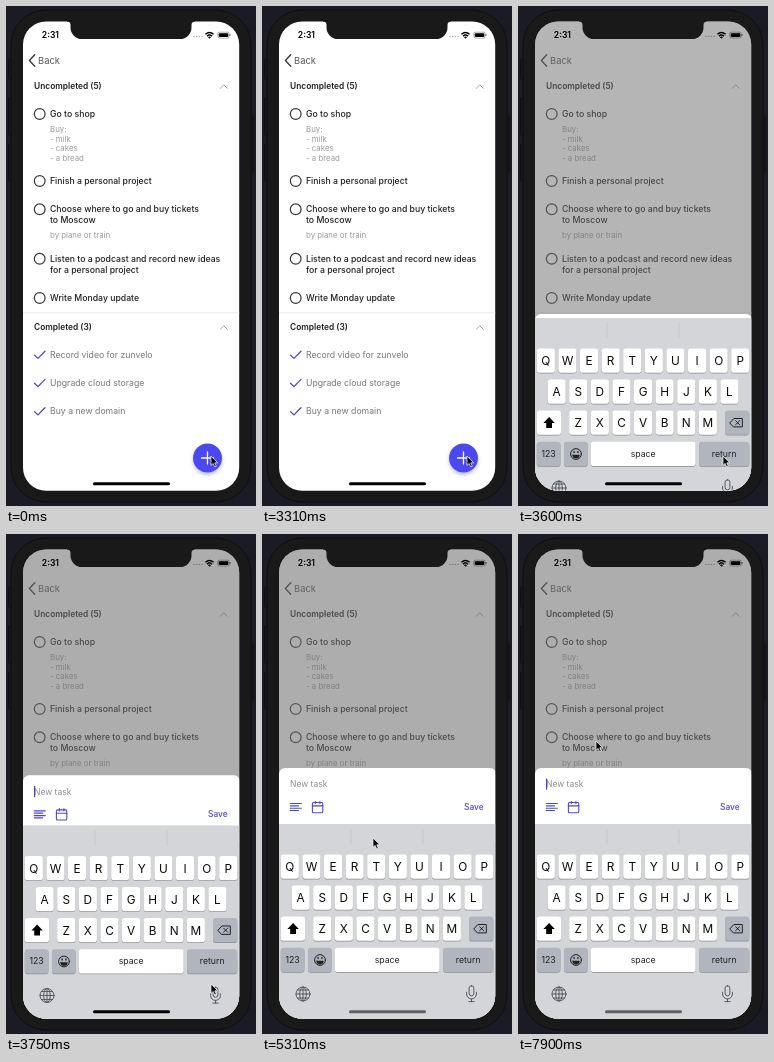
Write an HTML page that moves like this. It is 250x500 px and loops after 7.99 s.

```html
<!DOCTYPE html>
<html lang="en">
<head>
<meta charset="utf-8">
<title>New task sheet</title>
<style>
  html, body { margin: 0; width: 100%; height: 100%; overflow: hidden; background: #1a1b24; }
  svg { display: block; width: 100vw; height: 100vh; }
  text { font-family: Inter, "Open Sans", sans-serif; font-size: 8.7px; fill: #202024; white-space: pre; }
  .head { font-weight: 600; font-size: 8.4px; }
  .task { font-weight: 500; }
  .note { font-size: 7.85px; fill: #9a9a9e; }
  .done { fill: #77777b; }
  .mid { text-anchor: middle; }
  .line { fill: none; stroke-linecap: round; stroke-linejoin: round; }
  .accent { stroke: #4b45d6; }
  .letter { font-size: 11.8px; fill: #0a0a0a; }
</style>
</head>
<body>
<svg viewBox="0 0 250 500" xmlns="http://www.w3.org/2000/svg">
  <defs>
    <clipPath id="screen"><rect x="17" y="15.5" width="216.2" height="469.3" rx="23"/></clipPath>
    <filter id="soft" x="-50%" y="-50%" width="200%" height="200%"><feGaussianBlur stdDeviation="2.2"/></filter>
  </defs>

  <rect width="250" height="500" fill="#1a1b24"/>
  <g fill="#18181b" stroke="#0b0b0e" stroke-width=".7">
    <rect x="2.5" y="54" width="5" height="19" rx="1"/>
    <rect x="2.5" y="92" width="5" height="37" rx="1"/>
    <rect x="2.5" y="138" width="5" height="37" rx="1"/>
    <rect x="242" y="110" width="5" height="56" rx="1"/>
  </g>
  <rect x="5" y="4" width="240" height="492" rx="35" fill="#191919" stroke="#0e0e10"/>

  <g clip-path="url(#screen)">
    <rect x="17" y="15" width="217" height="470" fill="#fff"/>
    <g id="list">
      <path class="line" d="M28.7 48.7L23.4 54.5L28.7 60.3" stroke="#3c3c40" stroke-width="1.4"/>
      <text x="32" y="57.6" style="font-size:9.4px;fill:#56565a">Back</text>
      <path d="M17 306.8H234" stroke="#ececee"/>
    </g>
    <g id="fab">
      <circle cx="201.5" cy="454.5" r="14" fill="#4a48e8" opacity=".4" filter="url(#soft)"/>
      <circle cx="201.5" cy="452" r="14.5" fill="#4a48ee"/>
      <path class="line" d="M195.5 452H207.5M201.5 446V458" stroke="#fff" stroke-width="1.3"/>
    </g>
    <rect id="dim" x="17" y="15" width="217" height="470" fill="#6d6d6d" opacity="0"/>

    <g id="sheet">
      <rect x="17" y="234" width="217" height="270" rx="6" fill="#fff"/>
      <text x="28" y="253.4" style="font-size:8.5px;fill:#8d8d92">New task</text>
      <rect id="caret" x="28" y="244.3" width="1.2" height="11.5" rx=".5" fill="#4b45d6"/>
      <path class="line accent" d="M28.3 269.5H39.3M28.3 271.8H36.6M28.3 274.2H39.3M28.3 276.5H36.6" stroke-width="1.15"/>
      <g class="line accent" stroke-width="1.1">
        <rect x="50.4" y="268.5" width="10.4" height="10.2" rx="1.3"/>
        <path d="M50.4 271.9H60.8M53.3 267.3V269.5M57.9 267.3V269.5"/>
      </g>
      <text x="202" y="275.9" class="task" style="font-size:8.4px;fill:#4b45d6">Save</text>
    </g>

    <g id="keyboard">
      <rect x="17" y="290" width="217" height="200" fill="#d3d5d9"/>
      <path d="M89 295V310M161 295V310" stroke="#c2c4c9" stroke-width=".8"/>
      <g id="keys"></g>
      <path d="M31.1 389L36.8 395H34V400H28.2V395H25.4Z" fill="#000"/>
      <g class="line" stroke="#222" stroke-width="1">
        <path d="M212 394.7L215.8 390.5H224.3V398.9H215.8ZM217.6 392.7L221.6 396.7M221.6 392.7L217.6 396.7"/>
        <circle cx="58" cy="426" r="5.4"/>
        <path d="M54.6 427H61.4A3.4 3.2 0 0 1 54.6 427Z" fill="#222" stroke-width=".5"/>
        <path d="M56.1 423.4V424.5M59.9 423.4V424.5" stroke-width="1.3"/>
      </g>
      <g class="line" stroke="#4d5259" stroke-width=".9">
        <circle cx="41" cy="460" r="7"/>
        <ellipse cx="41" cy="460" rx="3.3" ry="7"/>
        <path d="M41 453V467M34 460H48M35.5 456H46.5M35.5 464H46.5"/>
        <rect x="207.1" y="451.8" width="4.8" height="10" rx="2.4"/>
        <path d="M204.6 458.3V460A4.9 4.9 0 0 0 214.4 460V458.3M209.5 465V467.6M206.8 467.6H212.2"/>
      </g>
    </g>

    <rect id="home" x="87" y="476.2" width="77" height="3" rx="1.5"/>

    <text x="35.8" y="32.2" class="head" style="font-size:8.6px;fill:#000">2:31</text>
    <g opacity=".3">
      <circle cx="188" cy="30.5" r=".8"/><circle cx="190.7" cy="30.5" r=".8"/>
      <circle cx="193.4" cy="30.5" r=".8"/><circle cx="196.1" cy="30.5" r=".8"/>
    </g>
    <g fill="none" stroke="#000" stroke-width="1.4">
      <path d="M199.4 28.2Q203.5 24.6 207.6 28.2M201 30.1Q203.5 27.9 206 30.1"/>
    </g>
    <path d="M202 31.2Q203.5 30 205 31.2L203.5 32.8Z"/>
    <rect x="211.7" y="26.2" width="11.6" height="5.8" rx="1.7" fill="none" stroke="#000" stroke-opacity=".5" stroke-width=".6"/>
    <rect x="212.7" y="27.2" width="9.6" height="3.8" rx=".9"/>
    <path d="M224 28.1V30.1" stroke="#000" stroke-opacity=".5"/>
  </g>

  <path d="M61 14.5H189V15.5Q185.5 15.5 185.5 19V21.5A11.5 11.5 0 0 1 174 33H76A11.5 11.5 0 0 1 64.5 21.5V19Q64.5 15.5 61 15.5Z" fill="#191919"/>
  <path id="cursor" d="M0 0V9.4L2.2 7.4L3.7 10.9L5.3 10.2L3.8 6.8H6.8Z" fill="#000" stroke="#fff" stroke-width=".7"/>
</svg>

<script>
const LOOP = 7990, STEP = 50;
const OPEN = 3500, SETTLED = 4900;
const $ = id => document.getElementById(id);

function add(parent, tag, attrs, content = '') {
  const node = document.createElementNS('http://www.w3.org/2000/svg', tag);
  for (const name in attrs) node.setAttribute(name, attrs[name]);
  node.textContent = content;
  parent.append(node);
}

// List content: class, vertical centre, text
const rows = [
  ['head', 80.3, 'Uncompleted (5)'],
  ['task', 108, 'Go to shop'],
  ['note', 123, 'Buy:'], ['note', 132.6, '- milk'], ['note', 142.2, '- cakes'], ['note', 151.8, '- a bread'],
  ['task', 175, 'Finish a personal project'],
  ['task', 203.3, 'Choose where to go and buy tickets'], ['task more', 214.3, 'to Moscow'],
  ['note', 229.2, 'by plane or train'],
  ['task', 252.8, 'Listen to a podcast and record new ideas'], ['task more', 263.8, 'for a personal project'],
  ['task', 292, 'Write Monday update'],
  ['head', 321.3, 'Completed (3)'],
  ['done', 348.8, 'Record video for zunvelo'],
  ['done', 377, 'Upgrade cloud storage'],
  ['done', 405.3, 'Buy a new domain']
];
const list = $('list');
for (const [kind, y, label] of rows) {
  add(list, 'text', { class: kind, x: kind === 'head' ? 28 : 44, y: y + 3.1 }, label);
  if (kind === 'task')
    add(list, 'circle', { cx: 33.7, cy: y, r: 5.4, fill: 'none', stroke: '#37373b', 'stroke-width': 1.2 });
  if (kind === 'done')
    add(list, 'path', { class: 'line accent', d: `M28.5 ${y + .3}L32 ${y + 3.6}L39 ${y - 3.6}`, 'stroke-width': 1.3 });
  if (kind === 'head')
    add(list, 'path', { class: 'line', d: `M214.3 ${y + 2}L217.8 ${y - 1.5}L221.3 ${y + 2}`, stroke: '#a5a5aa' });
}

// Keyboard
const PITCH = 21.6, KEY_W = 18.1, KEY_H = 24.2;
function key(x, y, w, fill, label = '', kind = '') {
  const box = { x, width: w, height: KEY_H, rx: 2.8 };
  add($('keys'), 'rect', { ...box, y: y + .8, fill: '#8b8e94' });
  add($('keys'), 'rect', { ...box, y, fill });
  add($('keys'), 'text', { class: 'mid ' + kind, x: x + w / 2, y: y + (kind ? 16.5 : 15.2) }, label);
}
const GREY = '#b0b5be', WHITE = '#fff';
['QWERTYUIOP', 'ASDFGHJKL', 'ZXCVBNM'].forEach((letters, row) => {
  const left = 18.8 + PITCH * [0, .5, 1.5][row];
  [...letters].forEach((c, i) => key(left + i * PITCH, 320.6 + row * 31, KEY_W, WHITE, c, 'letter'));
});
key(18.8, 382.6, KEY_W + 6.1, WHITE);
key(207, 382.6, KEY_W + 6.1, GREY);
key(18.8, 413.8, 23.6, GREY, '123');
key(46, 413.8, 23.6, GREY);
key(72.8, 413.8, 104.8, WHITE, 'space');
key(181.2, 413.8, 50, GREY, 'return');

// Pointer tip: time, x, y
const pointer = [
  [0, 205, 450], [4500, 205, 450], [4550, 204, 449], [4850, 204, 449], [4900, 200, 444],
  [5000, 184, 422], [5150, 142, 354], [5300, 111, 304], [5450, 95, 275], [5650, 86, 258],
  [5700, 85, 256], [6250, 74, 245], [6450, 74, 245], [6750, 72, 239], [7300, 72, 239],
  [7500, 73, 231], [7700, 76, 216], [7900, 78, 207], [LOOP, 78, 207]
];
// Time, opacity
const homeFade = [[0, 1], [4900, 1], [5250, .55], [LOOP, .55]];
const blink = [[0, 1], [50, .5], [100, 0], [450, 0], [500, .4], [550, .8], [600, 1], [1000, 1]];

function sample(table, t) {
  const i = Math.max(1, table.findIndex(row => row[0] >= t));
  const a = table[i - 1], b = table[i];
  const k = (t - a[0]) / (b[0] - a[0]);
  return a.slice(1).map((v, j) => v + (b[j + 1] - v) * k);
}
const shift = (id, x, y) => $(id).setAttribute('transform', `translate(${x} ${y})`);
const fade = (id, value) => $(id).setAttribute('opacity', value);

function draw(t) {
  // The sheet rests just short of its place until the pointer starts moving.
  const age = t < SETTLED ? Math.min(t - OPEN, 400) : t - OPEN;
  const open = age >= 0;
  const decay = (size, rate) => size * Math.exp(-age / rate);
  shift('keyboard', 0, open ? decay(133, 55.6) : 250);
  shift('sheet', 0, open ? decay(345, 65) : 300);
  fade('dim', open ? .56 - decay(.34, 55) : 0);
  fade('caret', t < 5000 ? 1 : sample(blink, t % 1000)[0]);
  fade('home', sample(homeFade, t)[0]);
  shift('cursor', ...sample(pointer, t));
}

const start = performance.now();
function tick() {
  const t = (performance.now() - start) % LOOP;
  draw(Math.floor(t / STEP) * STEP);
  requestAnimationFrame(tick);
}
tick();
</script>
</body>
</html>
```
